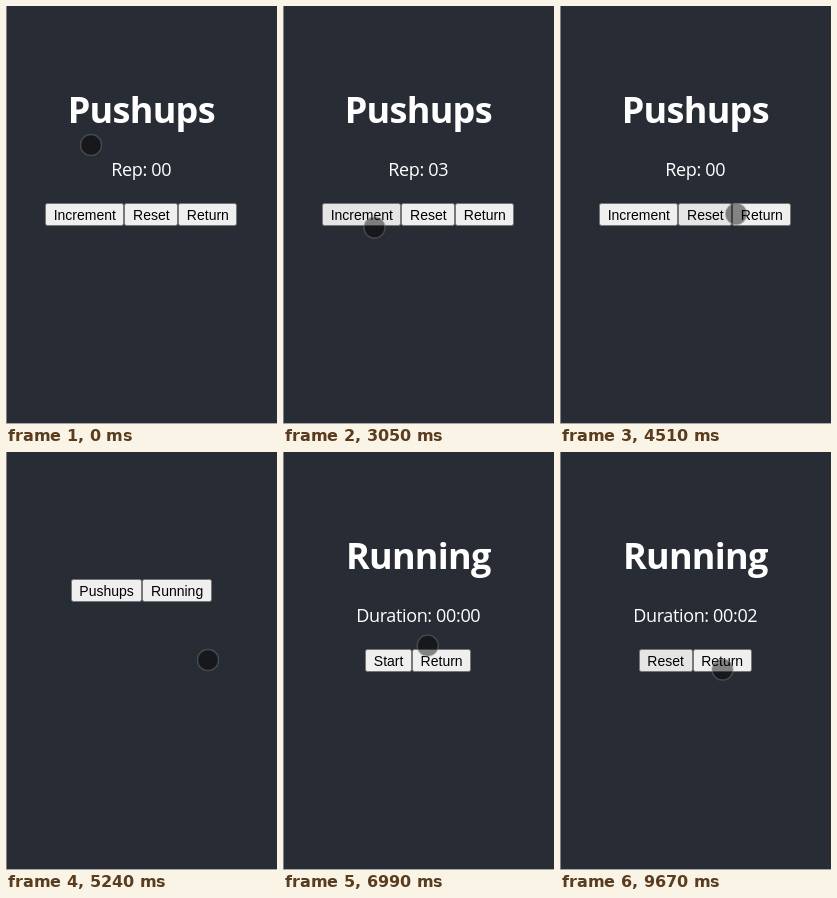
An HTML page with a canvas that plays this animation: 271 by 418 pixels, repeating every 9690 ms.

```html
<!DOCTYPE html>
<html lang="en">
<head>
<meta charset="utf-8">
<title>Workout counter</title>
<style>
  html, body { margin: 0; width: 100%; height: 100%; overflow: hidden; background: #282c34; }
  canvas { display: block; }
</style>
</head>
<body>
<canvas id="stage" width="271" height="418"></canvas>
<script>
const ctx = document.getElementById('stage').getContext('2d');
const W = 271, H = 418, LOOP = 9690, MID = 135.25;
const TICK = 120, SECOND = 980;
const UI = '"Open Sans", "Noto Sans", sans-serif';
const BUTTON_FONT = '14px "Liberation Sans", Arial, sans-serif';
const FACE = '#efefef', HOVER = '#e5e5e5', ACTIVE = '#f5f5f5';
const PAD = 8.6;

const spots = {
  Increment: { x: 91.5, y: 221.5 },
  Reset: { x: 167.5, y: 208 },
  Return: { x: 202, y: 208 },
  Running: { x: 177.5, y: 138 },
  Start: { x: 97.5, y: 217 },
  Back: { x: 162.5, y: 217.5 }
};

// What the visitor does: glide to a spot in some ticks, or tap a button
const script = [
  { at: 740, go: 'Increment', ticks: 5 },
  { at: 1590, tap: 'Increment' },
  { at: 2320, tap: 'Increment' },
  { at: 2930, tap: 'Increment' },
  { at: 3170, go: 'Reset', ticks: 4 },
  { at: 4020, tap: 'Reset' },
  { at: 4510, go: 'Return', ticks: 5 },
  { at: 5240, tap: 'Return' },
  { at: 5610, go: 'Running', ticks: 6 },
  { at: 6630, tap: 'Running' },
  { at: 6870, go: 'Start', ticks: 6 },
  { at: 7710, tap: 'Start' },
  { at: 8950, go: 'Back', ticks: 5 }
];

const pad = n => String(n).padStart(2, '0');
const easeOut = (p, power) => 1 - (1 - p) ** power;

const taps = {
  Increment: s => { s.reps++; s.hot = 'Increment'; },
  Reset: s => { s.reps = 0; s.hot = 'Reset'; },
  Return: s => { s.page = 'menu'; s.hot = ''; },
  Running: s => { s.page = 'running'; },
  Start: (s, at) => { s.started = at; s.hot = 'Reset'; }
};

// Replays the script up to time t
function stateAt(t) {
  const s = { page: 'pushups', reps: 0, hot: '', flash: false, started: Infinity, x: 85, y: 139, down: false };
  for (const { at, go, ticks, tap } of script) {
    if (tap && tap !== 'Return' && t >= at - TICK && t < at) s.down = true;
    if (t < at) break;
    if (go) {
      const p = Math.min(1, (Math.floor((t - at) / TICK) + 1) / ticks);
      s.x += (spots[go].x - s.x) * easeOut(p, 1.3);
      s.y += (spots[go].y - s.y) * easeOut(p, 3);
    } else {
      taps[tap](s, at);
      s.flash = t < at + TICK;
    }
  }
  return s;
}

function label(text, y, font) {
  ctx.font = font;
  ctx.letterSpacing = '-0.02em';
  ctx.fillStyle = '#fff';
  ctx.textAlign = 'center';
  ctx.fillText(text, MID, y);
  ctx.letterSpacing = '0px';
}

// A centred row of buttons; the hot one was tapped last
function buttons(y, names, s) {
  ctx.font = BUTTON_FONT;
  ctx.textAlign = 'left';
  const widths = names.map(name => ctx.measureText(name).width + 2 * PAD);
  let x = MID - widths.reduce((a, b) => a + b) / 2;
  names.forEach((name, i) => {
    const left = Math.round(x), right = Math.round(x + widths[i]);
    ctx.beginPath();
    ctx.roundRect(left + 0.5, y + 0.5, right - left - 1, 22, 2);
    ctx.fillStyle = name !== s.hot ? FACE : s.flash ? ACTIVE : HOVER;
    ctx.fill();
    ctx.strokeStyle = '#767676';
    ctx.lineWidth = 1;
    ctx.stroke();
    ctx.fillStyle = '#000';
    ctx.fillText(name, x + PAD, y + 17);
    x += widths[i];
  });
}

function exercise(title, info, names, s) {
  label(title, 117, 'bold 36px ' + UI);
  label(info, 170, '18px ' + UI);
  buttons(197, names, s);
}

const pages = {
  pushups: s => exercise('Pushups', 'Rep: ' + pad(s.reps), ['Increment', 'Reset', 'Return'], s),
  menu: s => buttons(127, ['Pushups', 'Running'], s),
  running(s, t) {
    const secs = Math.max(0, Math.floor((t - s.started) / SECOND));
    const action = t < s.started ? 'Start' : 'Reset';
    exercise('Running', 'Duration: 00:' + pad(secs), [action, 'Return'], s);
  }
};

function pointer({ x, y, down }) {
  ctx.beginPath();
  ctx.arc(x, y, down ? 9.5 : 10.5, 0, Math.PI * 2);
  ctx.fillStyle = 'rgba(0,0,0,0.45)';
  ctx.fill();
  ctx.lineWidth = 1.4;
  ctx.strokeStyle = down ? 'rgba(255,255,255,0.85)' : 'rgba(128,128,128,0.4)';
  ctx.stroke();
}

function draw(t) {
  const s = stateAt(t);
  ctx.fillStyle = '#282c34';
  ctx.fillRect(0, 0, W, H);
  ctx.fillStyle = '#7f8184';
  ctx.fillRect(0, 0, 1, H);
  ctx.fillStyle = '#a8a9ab';
  ctx.fillRect(0, H - 1, W, 1);
  pages[s.page](s, t);
  pointer(s);
}

const begin = performance.now();
function tick() {
  draw((performance.now() - begin) % LOOP);
  requestAnimationFrame(tick);
}
tick();
</script>
</body>
</html>
```
